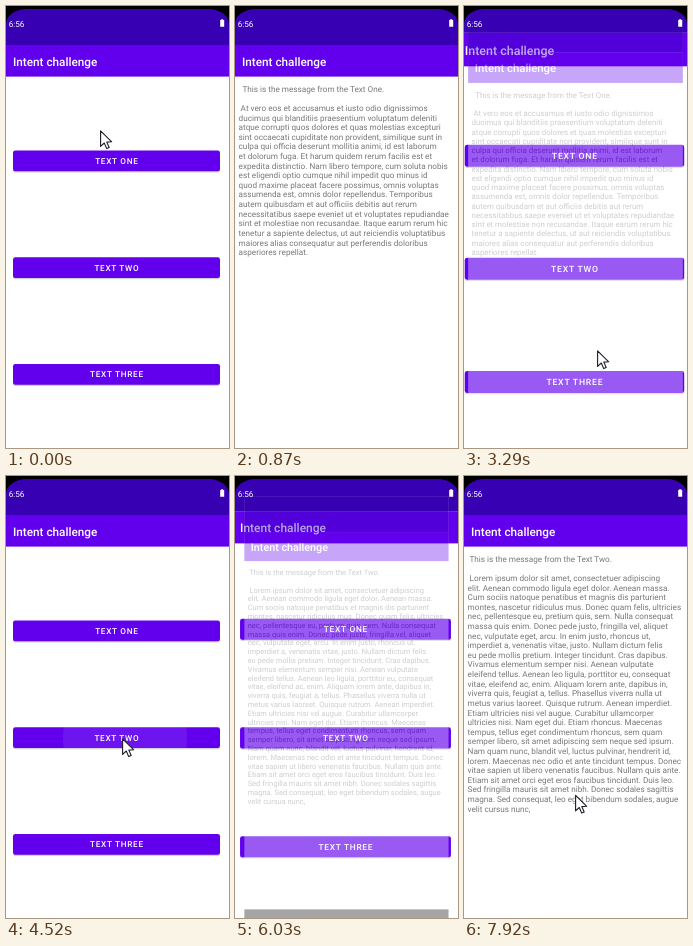
Animation, 223 px wide and 442 px high, one loop 8 s. Source, as an HTML page:

```html
<!DOCTYPE html>
<html lang="en">
<head>
<meta charset="utf-8">
<title>Intent challenge</title>
<style>
  html, body { margin: 0; width: 100%; height: 100%; overflow: hidden; background: #fff; }
  svg { display: block; width: 223px; height: 442px; }
  text { font-family: Roboto, sans-serif; font-size: 8.19px; fill: #fff; white-space: pre;
    text-rendering: geometricPrecision; }
  .title { font-size: 11.75px; font-weight: 500; }
  .label { font-weight: 500; letter-spacing: .731px; text-anchor: middle; }
  .body text { fill: #777; }
</style>
</head>
<body>
<svg id="stage" viewBox="0 0 223 442"></svg>
<script>
const LOOP = 8000, TICK = 120, CX = 111, CY = 242;

const messages = [
`  This is the message from the Text One.
 At vero eos et accusamus et iusto odio dignissimos
ducimus qui blanditiis praesentium voluptatum deleniti
atque corrupti quos dolores et quas molestias excepturi
sint occaecati cupiditate non provident, similique sunt in
culpa qui officia deserunt mollitia animi, id est laborum
et dolorum fuga. Et harum quidem rerum facilis est et
expedita distinctio. Nam libero tempore, cum soluta nobis
est eligendi optio cumque nihil impedit quo minus id
quod maxime placeat facere possimus, omnis voluptas
assumenda est, omnis dolor repellendus. Temporibus
autem quibusdam et aut officiis debitis aut rerum
necessitatibus saepe eveniet ut et voluptates repudiandae
sint et molestiae non recusandae. Itaque earum rerum hic
tenetur a sapiente delectus, ut aut reiciendis voluptatibus
maiores alias consequatur aut perferendis doloribus
asperiores repellat.`,
` This is the message from the Text Two.
 Lorem ipsum dolor sit amet, consectetuer adipiscing
elit. Aenean commodo ligula eget dolor. Aenean massa.
Cum sociis natoque penatibus et magnis dis parturient
montes, nascetur ridiculus mus. Donec quam felis, ultricies
nec, pellentesque eu, pretium quis, sem. Nulla consequat
massa quis enim. Donec pede justo, fringilla vel, aliquet
nec, vulputate eget, arcu. In enim justo, rhoncus ut,
imperdiet a, venenatis vitae, justo. Nullam dictum felis
eu pede mollis pretium. Integer tincidunt. Cras dapibus.
Vivamus elementum semper nisi. Aenean vulputate
eleifend tellus. Aenean leo ligula, porttitor eu, consequat
vitae, eleifend ac, enim. Aliquam lorem ante, dapibus in,
viverra quis, feugiat a, tellus. Phasellus viverra nulla ut
metus varius laoreet. Quisque rutrum. Aenean imperdiet.
Etiam ultricies nisi vel augue. Curabitur ullamcorper
ultricies nisi. Nam eget dui. Etiam rhoncus. Maecenas
tempus, tellus eget condimentum rhoncus, sem quam
semper libero, sit amet adipiscing sem neque sed ipsum.
Nam quam nunc, blandit vel, luctus pulvinar, hendrerit id,
lorem. Maecenas nec odio et ante tincidunt tempus. Donec
vitae sapien ut libero venenatis faucibus. Nullam quis ante.
Etiam sit amet orci eget eros faucibus tincidunt. Duis leo.
Sed fringilla mauris sit amet nibh. Donec sodales sagittis
magna. Sed consequat, leo eget bibendum sodales, augue
velit cursus nunc,`];

// When each message opens and closes.
const visits = [{ open: 390, close: 3290 }, { open: 5910, close: LOOP }];

// Pointer strokes: visible from show to hide, travelling between start and end.
const strokes = [
  { show: 0, start: 20, end: 140, hide: 260, from: [94, 124], to: [24, 106] },
  { show: 1900, start: 1900, end: 2290, hide: 2290, from: [-2, -1], to: [-2, -1] },
  { show: 2540, start: 2540, end: 2900, hide: 3290, from: [11, 159], to: [117, 352] },
  { show: 3290, start: 3290, end: 3770, hide: 4520, from: [133, 344], to: [119, 255] },
  { show: 4520, start: 4520, end: 4640, hide: 4760, from: [116, 262], to: [118, 245] },
  { show: 7420, start: 7420, end: 7900, hide: LOOP, from: [57, 146], to: [111, 318.5] }
];

const rect = (x, y, w, h, fill, more = '') =>
  `<rect x="${x}" y="${y}" width="${w}" height="${h}" fill="${fill}" ${more}/>`;
const text = (x, y, str, cls = '') => `<text x="${x}" y="${y}" class="${cls}">${str}</text>`;

const page = (id, content) => `<g id="${id}">
  ${rect(0, 0, 223, 500, '#fff')}
  ${rect(0, 0, 223, 39, '#3700b3')}
  ${rect(0, 39, 223, 31.6, '#6200ee')}
  ${text(7, 59.5, 'Intent challenge', 'title')}
  ${content}
  ${rect(0, 451, 223, 49, '#000')}</g>`;

const button = (y, str, extra = '') =>
  rect(7, y + 1.2, 207, 20.8, '#000', 'rx="2.3" opacity=".18"') +
  rect(7, y, 207, 20.8, '#6200ee', 'rx="2.3"') + extra +
  text(110.9, y + 13.4, str, 'label');

const message = str => '<g class="body">' + str.split('\n').map((line, i) =>
  text(3.6, i ? 105 + (i - 1) * 9.61 : 86, line)).join('') + '</g>';

const ripple = '<circle id="ripple" cx="119" cy="262" fill="#fff" clip-path="url(#second)"/>';

stage.innerHTML = `
  <clipPath id="second">${rect(7, 251.2, 207, 20.8, '#000', 'rx="2.3"')}</clipPath>
  ${page('home', button(144.5, 'TEXT ONE') + button(251.2, 'TEXT TWO', ripple) + button(358, 'TEXT THREE'))}
  ${messages.map((str, i) => page('message' + i, message(str))).join('')}
  <path d="M0 0H223V18A20 15 0 0 0 203 3H20A20 15 0 0 0 0 18Z"/>
  ${text(2.7, 20.5, '6:56')}
  <path d="M215.2 13.3h2v.8h1v6.7h-4v-6.7h1z" fill="#fff"/>
  <path id="cursor" d="M.6 .8V16.4L4.3 13 6.7 18.6 9.2 17.5 6.8 12.1 11.7 11.8Z"
    fill="#fff" stroke="#1c1c28" stroke-width="1.1" stroke-linejoin="round"/>`;

const $ = id => document.getElementById(id);
const show = (el, on) => { el.style.display = on ? '' : 'none'; };
const clamp = v => Math.min(1, Math.max(0, v));
const easeOut = u => 1 - (1 - u) ** 2;
const smooth = u => u * u * (3 - 2 * u);
const progress = (t, start, end) =>
  clamp(Math.floor((t - start) / TICK) * TICK / (end - start));
const zoom = (el, s) => el.setAttribute('transform',
  `translate(${CX * (1 - s)} ${CY * (1 - s)}) scale(${s})`);

function drawPages(t) {
  let homeScale = 1;
  visits.forEach(({ open, close }, i) => {
    let scale = 1, alpha = 0;
    if (t >= close) {
      const u = progress(t, close, close + 4 * TICK);
      homeScale = 1.06 - .06 * easeOut(u);
      scale = .963 - .1 * u;
      alpha = clamp(.35 - 1.4 * u);
    } else if (t >= open) {
      const u = progress(t, open, open + 4 * TICK);
      homeScale = 1 + .12 * smooth(u);
      scale = .85 + .15 * easeOut(u);
      alpha = clamp(5.6 * u * u);
    }
    const el = $('message' + i);
    show(el, alpha > 0);
    zoom(el, scale);
    el.setAttribute('opacity', alpha);
  });
  zoom($('home'), homeScale);
}

function drawRipple(t) {
  const fade = t < 4520 ? 0 : 1 - progress(t, 4900, 5140);
  $('ripple').setAttribute('r', 62 + 55 * progress(t, 4520, 4880));
  $('ripple').setAttribute('opacity', .08 * fade);
}

function drawCursor(t) {
  const stroke = strokes.find(s => t >= s.show && t < s.hide);
  show($('cursor'), stroke);
  if (!stroke) return;
  const { start, end, from, to } = stroke;
  const u = easeOut(progress(t, start, end));
  const [x, y] = from.map((v, i) => v + (to[i] - v) * u);
  $('cursor').setAttribute('transform', `translate(${x} ${y})`);
}

function draw() {
  const t = performance.now() % LOOP;
  drawPages(t);
  drawRipple(t);
  drawCursor(t);
  requestAnimationFrame(draw);
}
draw();
</script>
</body>
</html>
```
